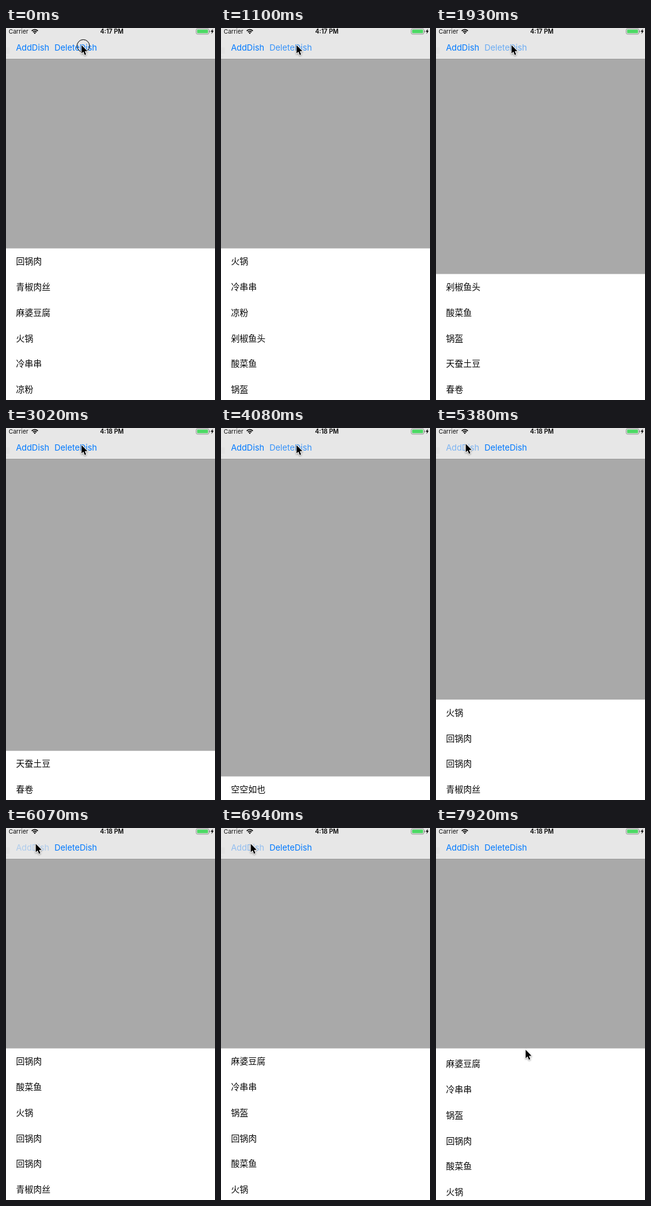
Animation of 334x592 px, one loop 8000 ms. Source, as an HTML page with a canvas:

```html
<!DOCTYPE html>
<html lang="zh-CN">
<head>
<meta charset="utf-8">
<title>Dish list</title>
<style>
html, body { margin: 0; width: 100%; height: 100%; overflow: hidden; background: #aaa; }
canvas { display: block; width: 334px; height: 592px; }
</style>
</head>
<body>
<canvas id="stage"></canvas>
<script>
const W = 334, H = 592, LOOP = 8000;
const ROW = 40.75, LAST_TOP = 554.5, MAX_ROWS = 6;
const UI = 'Inter, Roboto, sans-serif';
const HAN = '"Noto Sans CJK SC", "Noto Sans CJK", sans-serif';
const DELETE_TIP = [120.7, 27.2], ADD_TIP = [47.6, 25.2], DRAG_TIP = [143.3, 353];

const canvas = document.getElementById('stage');
const ctx = canvas.getContext('2d');
const dpr = window.devicePixelRatio || 1;
canvas.width = W * dpr;
canvas.height = H * dpr;

const menu = '回锅肉 青椒肉丝 麻婆豆腐 火锅 冷串串 凉粉 剁椒鱼头 酸菜鱼 锅盔 天蚕土豆 春卷'.split(' ');
const cut = { button: 'delete', apply: list => list.slice(3) };
const put = names => ({ button: 'add', apply: list => [...names.split(' '), ...list] });

// Each tap: touch down, touch up (when the list changes), effect
const taps = [
  { down: 510, up: 800, ...cut },
  { down: 1400, up: 1720, ...cut },
  { down: 2250, up: 2540, ...cut },
  { down: 3460, up: 3780, ...cut },
  { down: 4370, up: 4500, ...put('青椒肉丝') },
  { down: 4980, up: 5200, ...put('火锅 回锅肉 回锅肉') },
  { down: 5770, up: 6000, ...put('回锅肉 酸菜鱼') },
  { down: 6560, up: 6800, ...put('麻婆豆腐 冷串串 锅盔') }
];

const clamp = v => Math.min(1, Math.max(0, v));
const ease = v => { v = clamp(v); return v * v * (3 - 2 * v); };
const span = (t, from, to) => ease((t - from) / (to - from));
const mix = (a, b, k) => a + (b - a) * k;

function text(str, x, y, font, color, align = 'left') {
  ctx.font = font;
  ctx.fillStyle = color;
  ctx.textAlign = align;
  ctx.fillText(str, x, y);
}

function box(x, y, w, h, color) {
  ctx.fillStyle = color;
  ctx.fillRect(x, y, w, h);
}

function poly(points) {
  ctx.beginPath();
  points.forEach(([x, y]) => ctx.lineTo(x, y));
  ctx.closePath();
}

function buttonAlpha(name, t) {
  const tap = taps.filter(p => p.button === name && t >= p.down).pop();
  if (!tap) return 1;
  return t < tap.up ? 0.2 : mix(0.2, 1, span(t, tap.up, tap.up + 470));
}

function drawStatus(t) {
  text('Carrier', 4.2, 9.2, '9.6px ' + UI, '#111');
  text(t < 2500 ? '4:17 PM' : '4:18 PM', 169.2, 9.2, '600 9.8px ' + UI, '#000', 'center');

  // Wi-Fi fan
  ctx.strokeStyle = '#000';
  ctx.lineWidth = 1.7;
  const left = -Math.PI * 0.76, right = -Math.PI * 0.24;
  for (const r of [3.8, 6.7]) {
    ctx.beginPath();
    ctx.arc(46, 9.2, r, left, right);
    ctx.stroke();
  }
  ctx.fillStyle = '#000';
  ctx.beginPath();
  ctx.moveTo(46, 9.4);
  ctx.arc(46, 9.4, 2.2, left, right);
  ctx.fill();

  // Battery
  ctx.strokeStyle = '#8d8d8d';
  ctx.lineWidth = 0.9;
  ctx.beginPath();
  ctx.roundRect(303.9, 1, 20.4, 8.8, 2.3);
  ctx.stroke();
  ctx.fillStyle = '#4cd964';
  ctx.beginPath();
  ctx.roundRect(305.4, 2.5, 17.4, 5.8, 1);
  ctx.fill();
  box(325, 4, 1.1, 3, '#8d8d8d');
  ctx.fillStyle = '#000';
  poly([[330.5, 1.3], [327.2, 6], [329.2, 6], [328.4, 9.6], [332, 4.6], [329.9, 4.6]]);
  ctx.fill();
}

function drawBar(t) {
  box(0, 0, W, 49, '#e7e7e7');
  box(0, 31, 6, 10, '#e2e2e2');
  box(0, 44, 4, 3, '#e3e3e3');
  box(0, 49, W, 0.6, '#979797');
  drawStatus(t);
  const font = '13.3px ' + UI;
  ctx.globalAlpha = buttonAlpha('add', t);
  text('AddDish', 15.9, 36, font, '#007aff');
  ctx.globalAlpha = buttonAlpha('delete', t);
  text('DeleteDish', 77.4, 36, font, '#007aff');
  ctx.globalAlpha = 1;
}

function drawSheet(t) {
  const dishes = taps.filter(p => t >= p.up).reduce((list, p) => p.apply(list), menu);
  const rows = dishes.length ? dishes : ['空空如也'];
  const top = LAST_TOP - ROW * (Math.min(rows.length, MAX_ROWS) - 1);
  const pull = 4.2 * clamp((t - 7800) / 110);
  box(0, top, W, H - top, '#fff');
  rows.slice(0, MAX_ROWS).forEach((name, i) =>
    text(name, 15.9, top + 25.5 + ROW * i + pull, '13.8px ' + HAN, '#0a0a0a'));
}

function drawPointer(t) {
  const toAdd = span(t, 4110, 4350);
  const toList = span(t, 7180, 7780);
  const [x, y] = [0, 1].map(i =>
    mix(mix(DELETE_TIP[i], ADD_TIP[i], toAdd), DRAG_TIP[i], toList));

  if (t < 60 || taps.some(p => t >= p.down && t < p.up)) {
    ctx.strokeStyle = '#000';
    ctx.lineWidth = 1;
    ctx.beginPath();
    ctx.arc(x + 2.8, y + 1.3, 10, 0, Math.PI * 2);
    ctx.stroke();
  }

  ctx.save();
  ctx.translate(x, y);
  poly([[0, 0], [0, 13.4], [3, 10.6], [5.2, 15.7], [7.3, 14.8], [5.2, 9.8], [9.3, 9.6]]);
  ctx.lineJoin = 'round';
  ctx.lineWidth = 1.8;
  ctx.strokeStyle = '#fff';
  ctx.shadowColor = 'rgba(0,0,0,.4)';
  ctx.shadowBlur = 2.5 * dpr;
  ctx.shadowOffsetY = dpr;
  ctx.stroke();
  ctx.shadowColor = 'transparent';
  ctx.fillStyle = '#000';
  ctx.fill();
  ctx.restore();
}

function draw() {
  const t = performance.now() % LOOP;
  ctx.setTransform(dpr, 0, 0, dpr, 0, 0);
  box(0, 0, W, H, '#a9a9a9');
  drawBar(t);
  drawSheet(t);
  drawPointer(t);
  requestAnimationFrame(draw);
}
draw();
</script>
</body>
</html>
```
